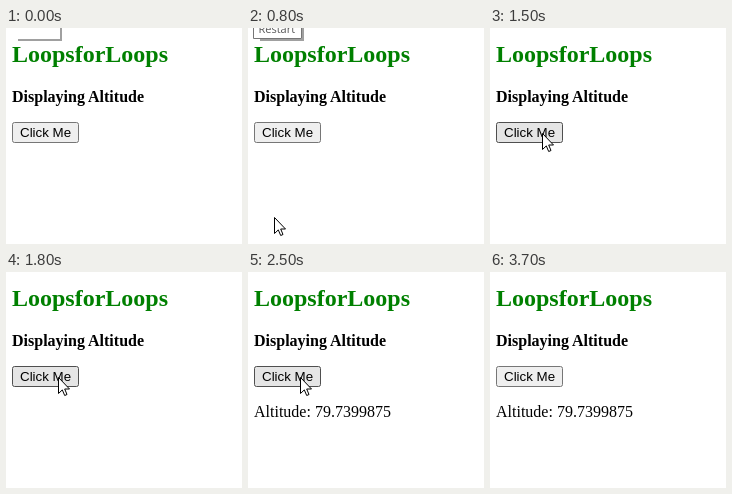
Recreate the animation shown at these times as an HTML page. Size 236x216 px, loop 4.7 s.

```html
<!DOCTYPE html>
<html lang="en">
<head>
<meta charset="utf-8">
<title>Displaying Altitude</title>
<style>
  html, body { margin: 0; width: 100%; height: 100%; overflow: hidden; background: #fff; }
  svg { display: block; }
  text { font: 16px "Liberation Serif", "Times New Roman", serif; white-space: pre; }
  .title { font-size: 24px; font-weight: bold; fill: green; }
  .sub { font-weight: bold; }
  .label { font: 13.333px "Liberation Sans", Arial, sans-serif; }
  .tip { font: 11px "Open Sans", sans-serif; fill: #575757; }
  #button { fill: #efefef; stroke: #767676; }
  #button.hover { fill: #e5e5e5; stroke: #4f4f4f; }
  #button.active { fill: #f5f5f5; stroke: #8d8d8d; }
</style>
</head>
<body>
<svg width="236" height="216" viewBox="0 0 236 216">
  <path id="shadow" d="M12 12H55V0" fill="none" stroke="#a0a0a0" stroke-width="2"/>
  <g id="tooltip">
    <path d="M5.5 -1V10.5H53.5V-1" fill="#fff" stroke="#767676"/>
    <text class="tip" x="10.5" y="5">Restart</text>
  </g>
  <text class="title" x="6" y="34">LoopsforLoops</text>
  <text class="sub" x="6" y="74">Displaying Altitude</text>
  <rect id="button" x="6.5" y="94.5" width="66" height="20" rx="2"/>
  <text class="label" x="14" y="109">Click Me</text>
  <text id="result" x="6" y="145">Altitude: 79.7399875</text>
  <path id="cursor" d="M.5 .5V16.5L4.3 12.9 6.7 18.5 9 17.5 6.7 12H11.5Z" fill="#fff" stroke="#000"/>
</svg>
<script>
  const LOOP = 4700, STEP = 100;
  const ENTER = 600, LEAVE = 3600;
  const get = id => document.getElementById(id);
  const [shadow, tooltip, button, result, cursor] =
    ["shadow", "tooltip", "button", "result", "cursor"].map(get);
  const show = (el, on) => el.setAttribute("visibility", on ? "visible" : "hidden");

  // Moves from a to b between two times, holding still outside them
  function glide(t, start, end, a, b) {
    const k = Math.min(1, Math.max(0, (t - start) / (end - start)));
    return a.map((v, i) => v + (b[i] - v) * k);
  }

  // Down from the top, up to the button, then off to the upper right
  function pointer(t) {
    const low = [26, 189], turn = [55, 153], rest = [52, 105];
    if (t < 800) return glide(t, ENTER, 800, [44, 74], low);
    if (t < 1200) return glide(t, 800, 1200, low, turn);
    if (t < 3500) return glide(t, 1200, 1500, turn, rest);
    return glide(t, 3500, LEAVE, [116, 98], [224, 9]);
  }

  function draw() {
    // The screen refreshes in whole steps
    const t = Math.floor(performance.now() % LOOP / STEP) * STEP;
    const within = (from, to) => t >= from && t < to;

    show(shadow, t < 1300);
    show(tooltip, within(100, 1300));
    show(result, t >= 2500);
    show(cursor, within(ENTER, LEAVE + STEP));

    const [x, y] = pointer(t).map(Math.round);
    cursor.setAttribute("transform", `translate(${x} ${y})`);

    button.setAttribute("class",
      within(2400, 2500) ? "active" : within(1400, LEAVE) ? "hover" : "");
    requestAnimationFrame(draw);
  }
  draw();
</script>
</body>
</html>
```
